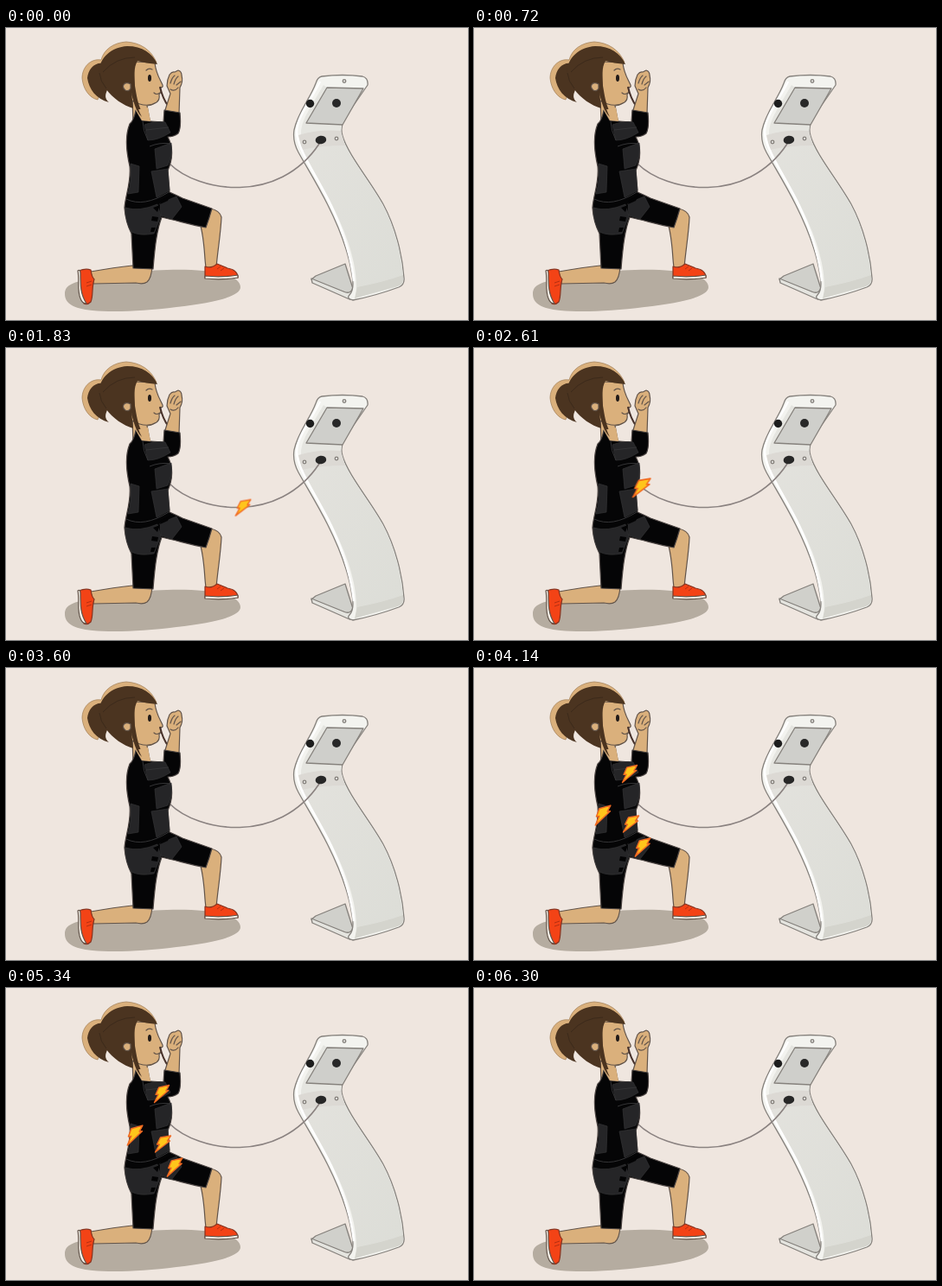
Recreate the animation shown at these times as an HTML page. Size 534 by 338 pixels, loop 6.33 s.

```html
<!DOCTYPE html>
<html lang="en">
<head>
<meta charset="utf-8">
<title>Muscle stimulation training</title>
<style>
  html, body { margin: 0; width: 100%; height: 100%; overflow: hidden; background: #efe6df; }
  svg { display: block; width: 534px; height: 338px; }
  .line { stroke: #62544a; stroke-width: 1.2; stroke-linejoin: round; stroke-linecap: round; }
  .skin { fill: #dab07c; }
  .hair { fill: #4b3420; }
  .suit { fill: #050506; stroke: #4a4341; }
  .pad { fill: #252527; stroke: #343436; stroke-width: .7; }
  .shoe { fill: #f34316; stroke: #87331f; }
  .metal { stroke: #85817c; stroke-width: 1.3; stroke-linejoin: round; }
  .none { fill: none; }

  .pulse {
    offset-path: path("M362 134C315 205 222 190 189 157");
    offset-rotate: 0deg;
    animation: travel 6330ms linear infinite, show-pulse 6330ms step-end infinite;
  }
  .spin { animation: turn 6330ms linear infinite; transform-origin: 0 0; }
  .charge { animation: charge 6330ms linear infinite; }

  @keyframes travel {
    0%, 13.74% { offset-distance: 0%; }
    42.18%, 100% { offset-distance: 100%; }
  }
  @keyframes show-pulse {
    0% { opacity: 0; }
    13.74% { opacity: 1; }
    43.1%, 100% { opacity: 0; }
  }
  @keyframes turn {
    0%, 13.74% { transform: rotate(-8deg) scale(.86); }
    28.9% { transform: rotate(0deg) scale(.98); }
    42.18%, 100% { transform: rotate(0deg) scale(1.14); }
  }
  @keyframes charge {
    0%, 58.3% { opacity: 0; }
    60.5%, 87% { opacity: 1; }
    89.2%, 100% { opacity: 0; }
  }
</style>
</head>
<body>
<svg viewBox="0 0 534 338">
  <defs>
    <path id="bolt" d="M-3-7 9-9 5-3 8-3-9 10-4 1-7 1Z" fill="#ffc51b" stroke="#f16a22" stroke-width="1.4" stroke-linejoin="round"/>
    <linearGradient id="side" x2="1" y2="1">
      <stop offset="0" stop-color="#e3e2dd"/>
      <stop offset="1" stop-color="#dcddd7"/>
    </linearGradient>
  </defs>

  <path fill="#b5aca0" d="M68 308C68 297 78 294 100 290C133 283 188 277 228 281C256 284 271 290 271 300C271 311 240 318 197 323C159 328 123 329 100 327C77 325 68 318 68 308Z"/>

  <!-- machine -->
  <g class="metal">
    <path fill="#d0d0cb" d="M353 291 358 287 392 273 402 305 397 308Z"/>
    <path fill="#e4e4df" d="M353 290 390 305Q399 309 401 300L402 314H397L354 295Z"/>
    <path fill="#f3f3ef" d="M365 56Q389 53 412 56Q419 58 418 66L391 105Q386 115 389 125C395 146 421 177 436 204C450 230 458 262 460 289Q461 297 454 300Q427 310 401 315Q393 313 397 309Q403 303 400 286C396 258 385 231 372 205C360 181 348 162 338 144Q331 131 333 118C337 98 352 81 358 64Q360 57 365 56Z"/>
  </g>
  <path fill="#e5e5e0" d="M367 66 371 69 347 110 388 113 387 121 341 124Q340 112 350 95Z"/>
  <path fill="url(#side)" d="M341 126Q365 122 388 125C394 146 420 177 435 204C449 230 457 262 459 289Q460 297 452 299L404 312C407 290 402 269 396 250C384 213 362 178 348 151Q340 138 341 126Z"/>
  <path fill="#d4d4cd" d="M406 300Q437 294 459 286Q460 297 453 299L403 313Z"/>
  <path fill="#dcd9d4" d="M338 124Q362 117 387 119L392 136Q365 136 342 141Z"/>
  <path fill="none" stroke="#fff" stroke-width="2.5" d="M363 62C352 84 336 104 336 120C336 140 361 174 376 206C390 236 399 265 402 293"/>
  <path class="metal" fill="#cfcfcb" d="M371 69 413 70 389 112 347 110Z"/>
  <circle cx="382" cy="87" r="5" fill="#282828"/>
  <g class="metal" fill="#deddda">
    <circle cx="391" cy="61.5" r="1.8"/>
    <circle cx="345" cy="132" r="1.8"/>
    <circle cx="382" cy="128" r="1.8"/>
  </g>
  <circle cx="351.5" cy="87.5" r="4.7" fill="#1d1d1d"/>

  <path class="none" stroke="#8a8280" stroke-width="1.6" d="M189 157C222 190 315 205 362 134"/>
  <ellipse cx="364" cy="129.5" rx="6.3" ry="4.8" fill="#272727" transform="rotate(-8 364 130)"/>

  <!-- legs -->
  <path class="skin line" d="M225 229 236 209Q247 211 249 219C248 239 245 255 243 277H231C229 263 230 250 225 229Z"/>
  <path class="skin line" d="M146 275 169 276Q168 290 163 294Q159 297 150 295L101 296 98 282Q126 277 146 275Z"/>
  <path class="shoe line" d="M230 276Q237 279 244 273L256 278Q268 280 268 289H230Z"/>
  <path class="line" fill="#f8f2e9" d="M230 287Q249 289 268 286V289Q250 292 230 290Z"/>
  <path class="none" stroke="#b52f12" d="M244 279 248 276M248 281 252 278"/>
  <path class="shoe line" d="M84 281Q92 278 98 280Q99 288 102 291C99 298 101 311 98 317Q94 321 90 319C85 309 86 294 84 281Z"/>
  <path class="line" fill="#f8f2e9" d="M83 281Q86 279 86 284C86 298 86 308 93 319Q88 319 86 313C82 304 85 292 83 281Z"/>
  <path class="none" stroke="#b52f12" d="M93 295 99 293M93 299 99 297"/>

  <!-- head -->
  <path class="skin" stroke="#a8865f" stroke-width=".8" d="M110 37C97 35 88 46 88 58C89 70 96 81 106 83L121 42L174 40C168 25 155 17 139 16C124 17 113 25 110 37Z"/>
  <path class="skin line" d="M146 80 174 84Q170 90 163 90L167 111H147Z"/>
  <path class="skin line" d="M123 38 172 40C173 53 179 61 181 66Q182 69 178 69L179 74 177 77Q178 83 174 86C163 93 145 88 138 75Z"/>
  <path class="hair" d="M113 41C102 39 95 48 94 58C96 71 104 82 119 86C114 82 114 77 118 70Z"/>
  <path class="hair" d="M107 52C108 34 122 22 140 21C158 21 169 29 175 42C166 41 158 40 152 38C147 46 149 57 149 67C151 78 152 87 157 97C150 93 146 84 145 74L147 93C136 90 123 81 116 71C111 64 107 58 107 52Z"/>
  <path class="none" stroke="#38271a" stroke-width=".8" d="M112 51Q127 34 149 34M116 70Q109 62 108 52"/>
  <path class="skin line" d="M144 65C136 61 133 68 138 72Q142 74 144 70Z"/>
  <ellipse cx="166" cy="58" rx="2" ry="4" fill="#211a18"/>
  <path class="none line" d="M162 49Q165 46 169 48M171 75Q174 78 178 75"/>
  <path class="none" stroke="#47312a" stroke-width="2" d="M178 68Q181 82 188 91"/>

  <!-- arm and suit -->
  <path class="skin line" d="M183 98 190 76 186 67Q186 60 189 54Q192 50 195 51L199 49Q203 50 203 55Q205 62 201 69L200 99Z"/>
  <path class="none line" d="M190 64Q192 57 195 55M194 65Q196 58 199 56M197 66 202 62M190 71Q195 74 199 69"/>
  <path class="suit line" d="M143 111Q148 107 150 95L157 107 168 108 182 109 183 95 201 98C202 108 202 117 199 122Q194 126 187 126C194 139 193 151 187 165L189 190Q196 193 204 197L238 209Q235 220 231 231C215 228 198 223 180 219C174 235 172 254 170 279L147 278 145 238Q138 224 137 208C138 194 145 177 143 160C139 143 137 126 143 111Z"/>
  <path class="skin" d="M150 95 157 107 167 108 164 92Z"/>
  <g class="pad">
    <path d="M160 112Q174 107 184 109L190 121Q176 130 164 130Z"/>
    <path d="M144 157 154 160 153 190 141 192Q146 175 144 157Z"/>
    <path d="M172 140 191 133Q193 146 187 159L174 163Z"/>
    <path d="M168 166 187 163 189 188 174 196Z"/>
    <path d="M138 208Q154 213 175 204L179 218 171 238Q155 241 145 236Q138 225 138 208Z"/>
    <path d="M178 203 197 195 203 207 192 221 179 217Z"/>
  </g>
  <path class="none" stroke="#343436" d="M158 108Q158 118 164 130M162 118 188 115M166 137Q178 132 190 134M139 198Q159 208 188 190"/>
  <path fill="#030304" d="M170 208 178 205 175 213ZM179 199 190 194 187 200 178 204ZM169 218 176 219 175 224 168 223ZM168 231 173 231 171 236 167 236Z"/>
  <path class="hair" d="M146 70C150 80 151 92 157 103C150 96 146 85 146 70Z"/>

  <g class="pulse"><g class="spin"><use href="#bolt"/></g></g>
  <g class="charge">
    <use href="#bolt" transform="translate(180 122) rotate(-3)"/>
    <use href="#bolt" transform="translate(149 170) rotate(-6) scale(1.1)"/>
    <use href="#bolt" transform="translate(181.5 180)"/>
    <use href="#bolt" transform="translate(195 207) rotate(-4) scale(1.05)"/>
  </g>
</svg>
</body>
</html>
```
